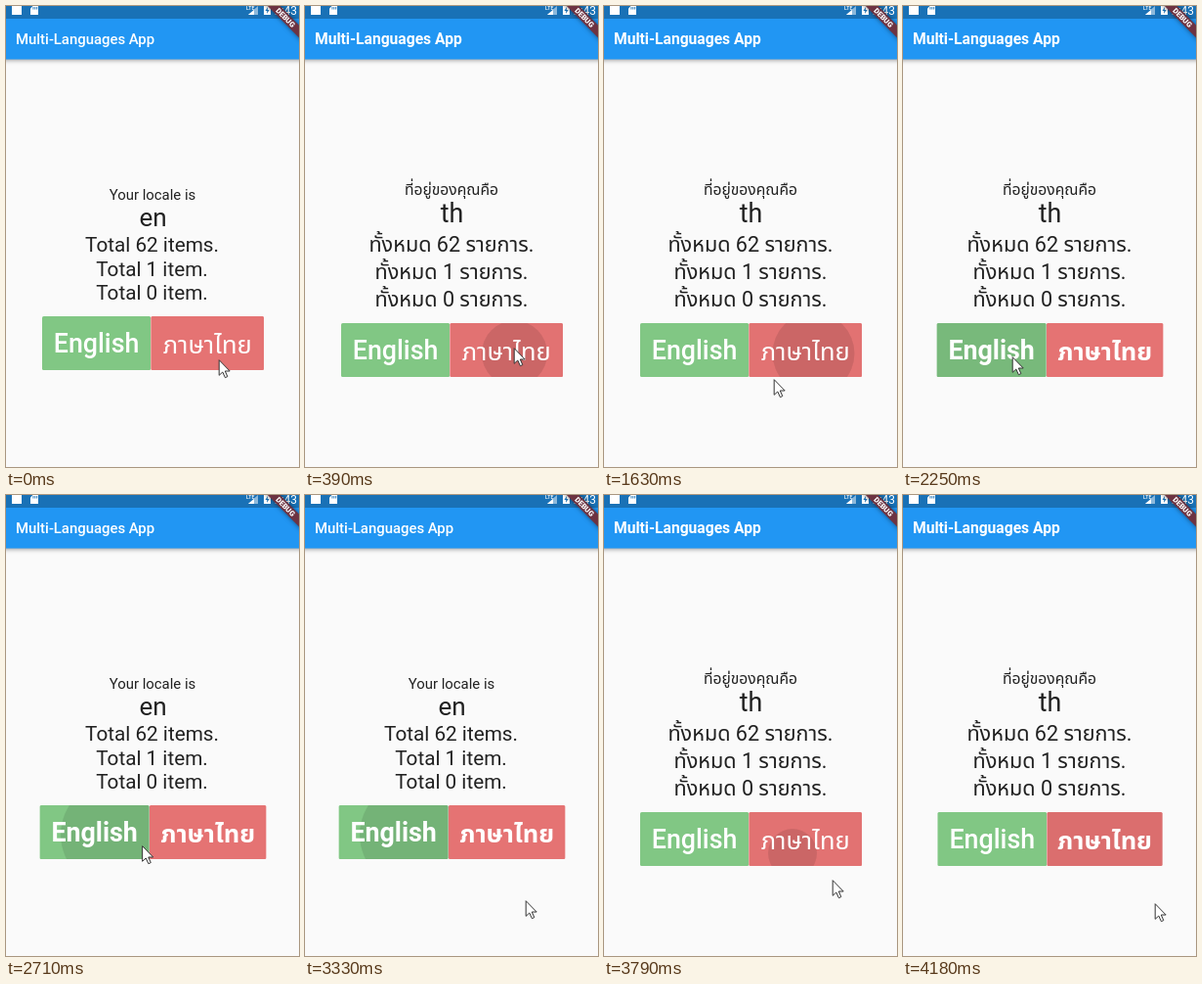
An HTML page with a canvas that plays this animation: 300 by 471 pixels, repeating every 4500 ms.

```html
<!DOCTYPE html>
<html lang="en">
<head>
<meta charset="utf-8">
<title>Multi-Languages App</title>
<style>
html, body { margin: 0; width: 100%; height: 100%; overflow: hidden; background: #fafafa; }
canvas { display: block; width: 300px; height: 471px; }
</style>
</head>
<body>
<canvas id="stage"></canvas>
<script>
const W = 300, H = 471, LOOP = 4500, STEP = 77.5;
const DP = 0.745; // stage pixels per layout unit
const FONT = "Roboto, 'Noto Sans Thai Looped', 'Noto Sans Thai', 'Noto Sans', sans-serif";
const INK = '#212121', DARK_BLUE = '#1971b6';
const canvas = document.getElementById('stage');
const dpr = window.devicePixelRatio || 1;
canvas.width = W * dpr;
canvas.height = H * dpr;
const c = canvas.getContext('2d');

// Pointer glides: from step, to step, end point
const HOME = { x: 218, y: 361 };
const GLIDES = [
  [1, 4, 214, 349], [8, 11, 239, 393], [16, 21, 174, 381], [21, 29, 112, 358],
  [33, 38, 190, 358], [39, 43, 226, 414], [43, 46, 241, 417], [46, 49, 234, 393],
  [51, 53, 241, 408], [53, 54, 258, 417]
];
const ARROW = new Path2D('M0 0V15.6L3.6 12.3L6.2 18L8.6 16.9L6.1 11.3H11Z');

const ramp = (k, from, to) => Math.min(1, Math.max(0, (k - from) / (to - from)));
const smooth = p => p * p * (3 - 2 * p);
const within = (k, from, to) => k >= from && k < to;

function text(str, x, y, size, weight = 400, color = INK, align = 'center') {
  c.font = `${weight} ${size * DP}px ${FONT}`;
  c.fillStyle = color;
  c.textAlign = align;
  c.fillText(str, x, y);
}

function rect(x, y, w, h, color) {
  c.fillStyle = color;
  c.fillRect(x, y, w, h);
}

function shape(path, color) {
  c.fillStyle = color;
  c.fill(new Path2D(path));
}

function shadowed(blur, alpha, paint) {
  c.save();
  c.shadowColor = `rgba(0,0,0,${alpha})`;
  c.shadowBlur = blur * dpr;
  paint();
  c.restore();
}

function statusBar() {
  rect(0, 0, W, 13, DARK_BLUE);
  rect(6, 0, 10, 9, '#fff');
  shape('M27.5 0H33V9H25V2.5Z', '#fff');
  for (let x = 27.5; x < 32; x += 1.9) rect(x, 1, 0.9, 2.5, DARK_BLUE);
  shape('M258 0V9H248Z', '#8db9dc');
  shape('M254 4V9H248Z', '#fff');
  text('LTE', 246, 4, 7, 500, '#fff', 'left');
  rect(264, 0, 7, 9, '#fff');
  shape('M268 1L265.5 5H267.3L267 8L269.6 4H267.8Z', DARK_BLUE);
  text('2:43', 298, 8.6, 16, 400, '#fff', 'right');
}

function appBar(thai) {
  shadowed(5, 0.45, () => rect(-6, 0, W + 12, 54.5, '#2196f3'));
  text('Multi-Languages App', 10, 38.5, thai ? 21 : 20, thai ? 700 : 500, '#fff', 'left');
}

function ribbon() {
  c.save();
  c.translate(W + 4, -6);
  c.rotate(Math.PI / 4);
  shadowed(5, 0.5, () => rect(-34, 28 * DP, 68, 12 * DP, '#6d3342'));
  text('DEBUG', 0, 37.5 * DP, 10.2, 900, '#fff');
  c.restore();
}

function labels(thai) {
  const counts = ['62', '1', '0'];
  if (thai) {
    text('ที่อยู่ของคุณคือ', 150, 193, 21);
    text('th', 150.5, 221, 36);
    counts.forEach((n, i) => text(`ทั้งหมด ${n} รายการ.`, 150, 251 + i * 28, 29));
  } else {
    text('Your locale is', 150, 198, 20);
    text('en', 150.5, 225, 35);
    counts.forEach((n, i) => text(`Total ${n} item${n > 1 ? 's' : ''}.`, 149.5, 251 + i * 24.5, 27.8));
  }
}

function button(x, y, w, color, shade, ripple) {
  c.save();
  c.beginPath();
  c.roundRect(x, y, w, 55, 1.6);
  c.clip();
  rect(x, y, w, 55, color);
  rect(x, y, w, 55, `rgba(0,0,0,${shade})`);
  if (ripple) {
    c.beginPath();
    c.arc(ripple.x, ripple.y, ripple.r, 0, 2 * Math.PI);
    c.fillStyle = 'rgba(0,0,0,.1)';
    c.fill();
  }
  c.restore();
}

function buttons(k, thai) {
  const grow = ramp(k, 21, 23) - ramp(k, 46, 48) + 0.67 * ramp(k, 51, 53);
  const y = thai ? 324 : 317;
  const left = 37 - 2.6 * grow, mid = 148.2 - 1.4 * grow, right = 264.2 + 2.4 * grow;

  let red = null, green = null;
  if (within(k, 1, 22)) red = { x: 214.5, y: y + 31, r: 42 * ramp(k, 1, 6) };
  if (within(k, 48, 53)) red = { x: 193, y: 366, r: 25 + (k - 49) * 17 };
  if (within(k, 30, 47)) green = { x: 111, y: 347, r: 55 };

  button(left, y, mid - left, '#81c784', within(k, 24, 30) ? 0.07 : 0, green);
  button(mid, y, right - mid, '#e57373', k >= 53 ? 0.045 : red ? 0.012 : 0, red);
  text('English', (left + mid) / 2, y + 36.5, 36, grow > 0.9 ? 700 : 500, '#fff');
  text('ภาษาไทย', (mid + right) / 2, y + 37.7, 34.3, grow > 0.4 ? 700 : 400, '#fff');
}

function pointer(k) {
  let { x, y } = HOME;
  for (const [from, to, endX, endY] of GLIDES) {
    const p = smooth(ramp(k, from, to));
    x += (endX - x) * p;
    y += (endY - y) * p;
  }
  c.save();
  c.translate(x + 0.2, y + 0.7);
  c.fillStyle = '#fff';
  c.fill(ARROW);
  c.lineJoin = 'round';
  c.strokeStyle = '#333';
  c.stroke(ARROW);
  c.restore();
}

function draw(now) {
  const k = Math.floor((now % LOOP + 12) / STEP);
  const thai = within(k, 4, 30) || k >= 48;
  c.setTransform(dpr, 0, 0, dpr, 0, 0);
  rect(0, 0, W, H, '#fafafa');
  appBar(thai);
  statusBar();
  ribbon();
  labels(thai);
  buttons(k, thai);
  pointer(k);
}

const start = performance.now();
function loop() {
  draw(performance.now() - start);
  requestAnimationFrame(loop);
}
loop();
</script>
</body>
</html>
```
